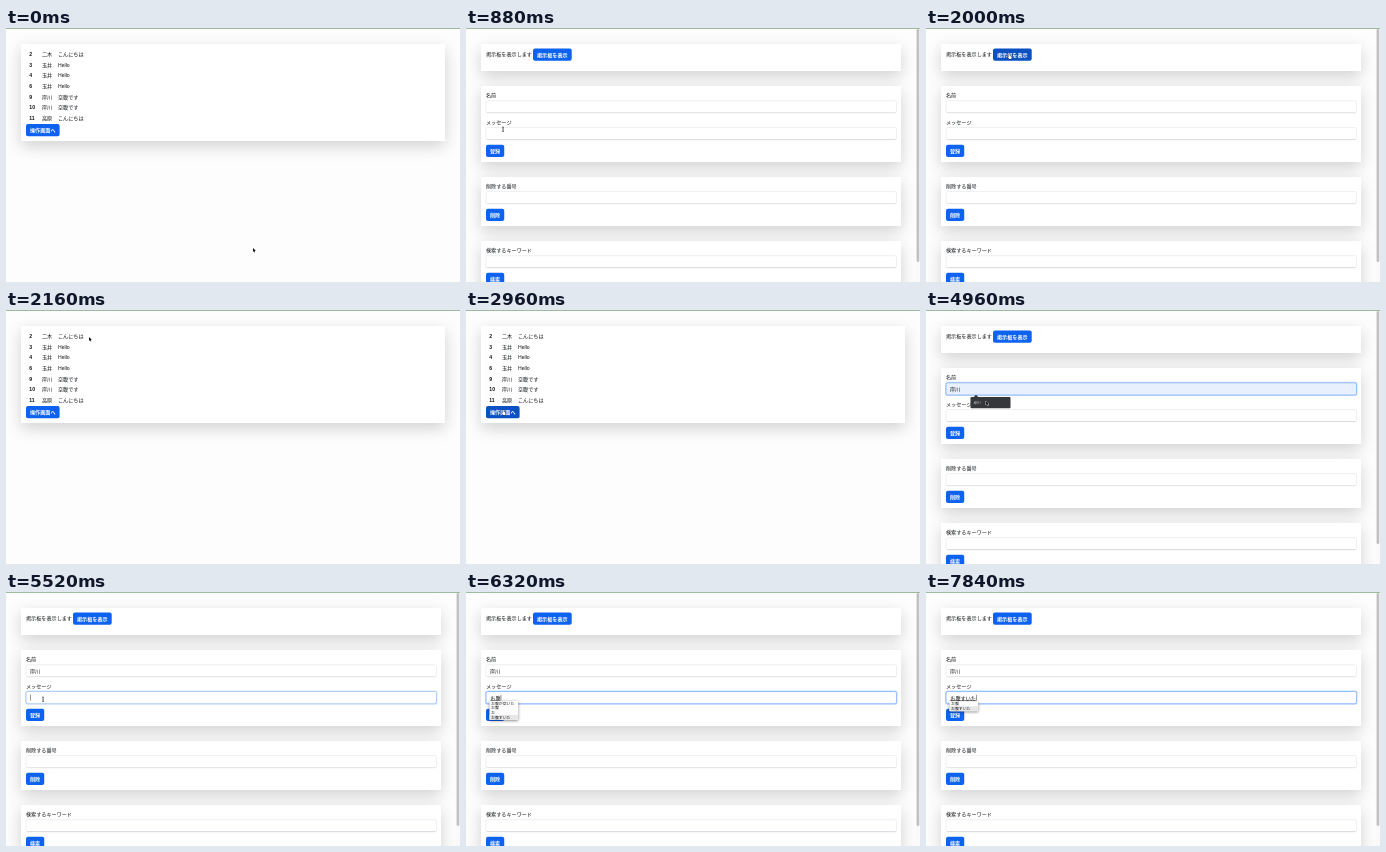
Animation, 454 px wide and 254 px high, one loop 8000 ms. Source, as an HTML page with a canvas:

```html
<!DOCTYPE html>
<html lang="ja">
<head>
<meta charset="utf-8">
<style>
html, body { margin: 0; width: 100%; height: 100%; overflow: hidden; background: #fdfdfd; }
canvas { display: block; width: 454px; height: 254px; }
</style>
</head>
<body>
<canvas id="stage"></canvas>
<script>
const LOOP = 8000, STEP = 80;
const stage = document.getElementById('stage');
const ctx = stage.getContext('2d');
const ratio = window.devicePixelRatio || 1;
stage.width = 454 * ratio;
stage.height = 254 * ratio;
ctx.scale(ratio, ratio);

const family = '"Liberation Sans", "Noto Sans CJK JP", "Noto Sans CJK", sans-serif';
const ROWS = [
  [2, '二木', 'こんにちは'], [3, '玉井', 'Hello'], [4, '玉井', 'Hello'], [6, '玉井', 'Hello'],
  [9, '岸川', '空腹です'], [10, '岸川', '空腹です'], [11, '高原', 'こんにちは']
];
// time, x, y
const PATH = [
  [0, 247, 220], [80, 247, 220], [560, 37, 101], [880, 37, 101], [1440, 98, 29], [1520, 98, 29],
  [1760, 83, 27], [2240, 83, 27], [2720, 37, 101], [3200, 37, 101], [3600, 39, 81],
  [4400, 39, 81], [4640, 60, 91], [5040, 60, 91], [5360, 37, 107], [8000, 37, 107]
];
const TYPED = [
  [6000, 'お'], [6080, 'おn'], [6160, 'おな'], [6240, 'おなk'], [6320, 'お腹'], [6560, 'お腹s'],
  [6640, 'お腹す'], [6960, 'お腹すい'], [7440, 'お腹すいt'], [7840, 'お腹すいた']
];
const clamp = v => Math.max(0, Math.min(1, v));
const inside = (p, x, y, w, h) => p.x >= x && p.x <= x + w && p.y >= y && p.y <= y + h;

function cursorAt(t) {
  const i = PATH.findIndex(k => k[0] > t);
  const [t0, x0, y0] = PATH[i - 1], [t1, x1, y1] = PATH[i];
  const u = (t - t0) / (t1 - t0), e = u * u * (3 - 2 * u);
  return { x: x0 + (x1 - x0) * e, y: y0 + (y1 - y0) * e, kind: 'arrow' };
}

function box(x, y, w, h, r, fill) {
  ctx.beginPath();
  ctx.roundRect(x, y, w, h, r);
  ctx.fillStyle = fill;
  ctx.fill();
}

function text(s, x, y, color = '#101316', weight = 500, size = 5.12) {
  ctx.font = `${weight} ${size}px ${family}`;
  ctx.fillStyle = color;
  ctx.textBaseline = 'alphabetic';
  ctx.fillText(s, x, y + size * 0.37);
  return ctx.measureText(s).width;
}

function shadowed(draw, color, dy, blur) {
  ctx.save();
  ctx.shadowColor = color;
  ctx.shadowOffsetY = dy * ratio;
  ctx.shadowBlur = blur * ratio;
  draw();
  ctx.restore();
}

function card(y, w, h) {
  shadowed(() => box(15, y, w, h, 0.5, '#fff'), 'rgba(0,0,0,.175)', 5.2, 15.5);
}

function button(s, x, y, cursor) {
  const w = [...s].length * 5.12 + 8, h = 12.2;
  const hover = inside(cursor, x, y, w, h);
  if (hover) cursor.kind = 'hand';
  box(x, y, w, h, 2, hover ? '#0b51c1' : '#0d63f0');
  text(s, x + 4, y + h / 2, '#fff', 600);
}

function input(y, cursor, focus = 0, fill = '#fff') {
  const x = 20, w = 410.5, h = 12.2;
  if (inside(cursor, x, y, w, h)) cursor.kind = 'beam';
  if (focus) box(x - 1, y - 1, w + 2, h + 2, 2.5, `rgba(13,110,253,${0.25 * focus})`);
  box(x, y, w, h, 1.8, fill);
  ctx.lineWidth = 0.4;
  ctx.strokeStyle = '#d3d7dc';
  ctx.stroke();
  if (focus) {
    ctx.globalAlpha = focus;
    ctx.lineWidth = 0.8;
    ctx.strokeStyle = '#86b7fe';
    ctx.stroke();
    ctx.globalAlpha = 1;
  } else {
    box(x + 1, y + h - 0.6, w - 2, 0.6, 0, '#d3d7dc');
  }
}

function listPage(cursor) {
  card(16, 424, 97);
  ROWS.forEach(([id, name, message], i) => {
    const y = 26.2 + i * 10.67;
    text(id, 23.3, y, '#101316', 700);
    text(name, 36, y);
    text(message, 52, y);
  });
  button('操作画面へ', 20, 96, cursor);
}

function autofill(active) {
  const color = active ? '#35373a' : '#222426';
  ctx.beginPath();
  ctx.moveTo(47.5, 87.2);
  ctx.lineTo(50, 84.8);
  ctx.lineTo(52.5, 87.2);
  ctx.fillStyle = color;
  ctx.fill();
  box(44.5, 87, 40, 11.3, 1, color);
  text('岸川', 47.5, 92.6, '#ddd', 400, 3.6);
}

function candidates(t) {
  const short = t >= 7440;
  const items = short ? ['お腹', 'お腹すいた'] : ['お腹が空いた', 'お腹', 'お', 'お腹すいた'];
  const y = short ? 109.2 : 108.8, h = items.length * 4.6 + 0.8;
  shadowed(() => box(23.4, y, 28.8, h, 0.8, '#fcfcfc'), 'rgba(0,0,0,.5)', 0.8, 3);
  box(23.4, y + h - 4.9, 28.8, 4.9, 0.8, '#e6e6e6');
  items.forEach((s, i) => text(s, 25, y + 2.6 + i * 4.6, '#222', 500, 3.9));
}

function formPage(t, cursor) {
  const nameFocus = t < 5360 ? clamp((t - 3600) / 160) : 1 - clamp((t - 5360) / 160);
  const messageFocus = clamp((t - 5360) / 240);
  const preview = t >= 4560 && t < 5040;
  const typed = TYPED.filter(k => k[0] <= t).pop();

  card(16, 420, 27);
  card(58, 420, 76);
  card(149, 420, 49);
  card(213, 420, 60);
  text('掲示板を表示します', 20, 26.4);
  button('掲示板を表示', 67, 20.6, cursor);

  text('名前', 20, 67);
  input(72.8, cursor, nameFocus, preview ? '#e8f0fe' : '#fff');
  if (t >= 4560) text('岸川', 24, 79);
  else if (t >= 3680) box(24.4, 76, 0.5, 6, 0, '#333');

  text('メッセージ', 20, 93.8);
  input(99.5, cursor, messageFocus);
  button('登録', 20, 116.8, cursor);
  if (typed) {
    const w = text(typed[1], 24.3, 105.7);
    box(24.3, 108.5, w, 0.5, 0, '#222');
    box(24.5 + w, 102.8, 0.5, 6, 0, '#333');
    if (t >= 6160) candidates(t);
  } else if (t >= 5440) {
    box(24.4, 102.6, 0.5, 6, 0, '#333');
  }

  text('削除する番号', 20, 157.8);
  input(163.6, cursor);
  button('削除', 20, 180.8, cursor);
  text('検索するキーワード', 20, 221.8);
  input(227.7, cursor);
  button('検索', 20, 244.8, cursor);

  if (t >= 3680 && t < 5040) {
    autofill(preview);
    if (inside(cursor, 44.5, 87, 40, 11.3)) cursor.kind = 'arrow';
  }
  box(449.6, 1, 4.4, 253, 0, '#fafafa');
  box(450.6, 1, 2.7, 233, 1.3, '#c1c1c1');
}

function drawCursor({ x, y, kind }) {
  ctx.save();
  ctx.translate(x, y);
  if (kind === 'beam') {
    box(-0.3, -2, 0.7, 4.6, 0, '#111');
    box(-1, -2.2, 2.1, 0.5, 0, '#333');
    box(-1, 2.3, 2.1, 0.5, 0, '#333');
  } else {
    const hand = 'M0 -1 L.7 -1 .8 1 2.6 1.4 2.3 4 .3 4 -1.4 1.7 -.9 1.3 0 2Z';
    const arrow = 'M0 0 L0 4 .9 3.2 1.6 4.6 2.2 4.3 1.6 2.9 2.8 2.8Z';
    const shape = new Path2D(kind === 'hand' ? hand : arrow);
    ctx.lineWidth = 0.7;
    ctx.strokeStyle = kind === 'hand' ? '#111' : '#fff';
    ctx.stroke(shape);
    ctx.fillStyle = kind === 'hand' ? '#fff' : '#111';
    ctx.fill(shape);
  }
  ctx.restore();
}

function render(now) {
  const t = Math.floor(now % LOOP / STEP) * STEP;
  const cursor = cursorAt(t);
  const onList = t < 720 || (t >= 2160 && t < 3120);
  box(0, 0, 454, 254, 0, '#fdfdfd');
  if (onList) listPage(cursor);
  else formPage(t, cursor);
  box(0, 0, 454, 1, 0, '#9dbb9f');
  if (t < 5840) drawCursor(cursor);
}

let start;
function tick(now) {
  start ??= now;
  render(now - start);
  requestAnimationFrame(tick);
}
render(0);
requestAnimationFrame(tick);
</script>
</body>
</html>
```
